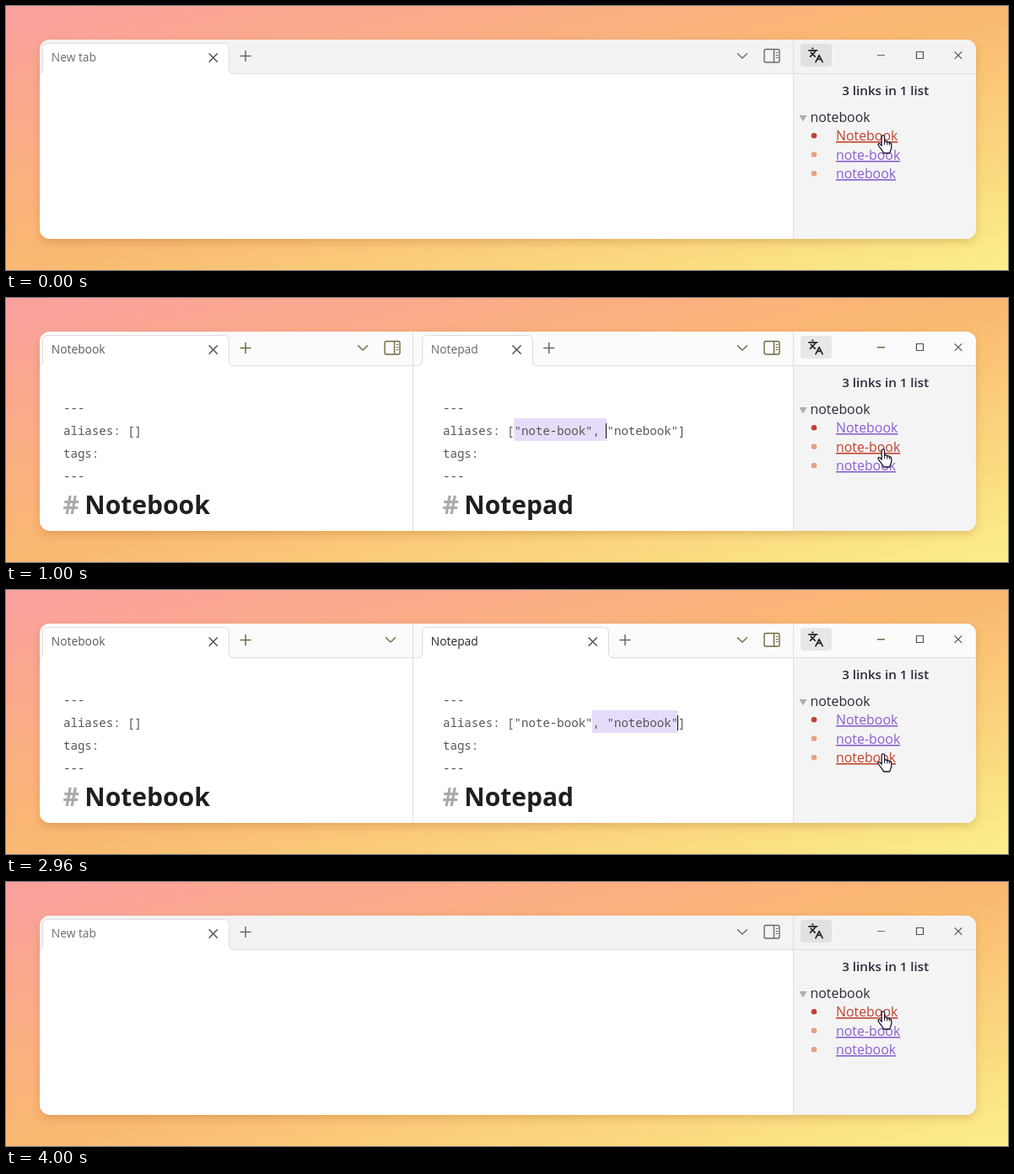
Write an HTML page that moves like this. It is 1188x314 px and loops after 4.04 s.

```html
<!DOCTYPE html>
<html lang="en">
<head>
<meta charset="utf-8">
<title>Alias links</title>
<style>
  html, body { margin: 0; width: 100%; height: 100%; overflow: hidden; }
  svg { display: block; width: 1188px; height: 314px; }
  text { font-family: "Open Sans", "Noto Sans", sans-serif; white-space: pre; }
  .tab { font-size: 13.8px; }
  .mono { font: 14.1px "Noto Sans Mono", "DejaVu Sans Mono", monospace; fill: #555; }
  .heading { font-size: 30px; font-weight: 700; fill: #1f1f22; }
  .hash { fill: #aaa; }
  .side { font-size: 15.9px; }
  .link { text-decoration: underline; text-decoration-thickness: 1px; text-underline-offset: 2px; }
  .line { fill: none; stroke-linecap: round; stroke-linejoin: round; }
</style>
</head>
<body>
<svg viewBox="0 0 1188 314">
  <defs>
    <linearGradient id="sky" x1="0" y1="0" x2="1" y2="1">
      <stop offset="0" stop-color="#faa09f"/>
      <stop offset=".5" stop-color="#fab870"/>
      <stop offset="1" stop-color="#fbef8a"/>
    </linearGradient>
    <clipPath id="window"><rect x="40" y="40" width="1110" height="237" rx="12"/></clipPath>
    <filter id="shadow" x="-5%" y="-20%" width="110%" height="150%">
      <feDropShadow dx="0" dy="4" stdDeviation="5" flood-color="#7a3a10" flood-opacity=".2"/>
    </filter>
  </defs>
  <rect width="1188" height="314" fill="url(#sky)"/>
  <rect x="40" y="40" width="1110" height="237" rx="12" fill="#fff" filter="url(#shadow)"/>
  <g id="scene" clip-path="url(#window)"></g>
  <g id="hand">
    <path d="M5.2 13.6V2.8a1.7 1.7 0 0 1 3.4 0V9C9 7.8 11.6 8 11.8 9.6C12.3 8.6 14.2 9 14.4 10.4C15.2 9.8 16.8 10.4 16.8 12V15.5C16.8 18 15.2 19.2 14.8 22.3H7.4C7 19.8 4.5 18 2.5 14.8C1 12.6 .5 11.6 1.6 11C2.8 10.4 4 11.6 5.2 13.6Z"
      fill="#fff" stroke="#1c1626" stroke-width="1.3" stroke-linejoin="round"/>
    <path d="M8.6 9V12.5M11.8 9.6V12.8M14.4 10.4V13" stroke="#1c1626" fill="none"/>
  </g>
</svg>
<script>
const LOOP = 4040;
const OPEN = 80, SPLIT = 800, LOADED = 960, SETTLED = 1120, SELECT = 1800, RESET = 3600;
const scene = document.getElementById('scene');
const hand = document.getElementById('hand');

// Time and height of the pointer; each height holds until the next.
const pointer = [
  [0, 152], [240, 154], [280, 158], [360, 167], [440, 172], [480, 175], [560, 178],
  [1120, 179], [1200, 182], [1240, 185], [1320, 188], [1360, 190], [1440, 191],
  [1560, 192], [1640, 193],
  [3600, 187], [3680, 176], [3760, 167], [3840, 160], [3920, 156], [3960, 153], [4000, 152]
];

const within = (t, from, to) => t >= from && t < to;
const rect = (x, y, w, h, fill, extra = '') =>
  `<rect x="${x}" y="${y}" width="${w}" height="${h}" fill="${fill}" ${extra}/>`;
const text = (x, y, words, cls, fill) =>
  `<text x="${x}" y="${y}" class="${cls}"${fill ? ` fill="${fill}"` : ''}>${words}</text>`;
const line = (d, color, width = 1.4) =>
  `<path class="line" d="${d}" stroke="${color}" stroke-width="${width}"/>`;
const cross = (x, y, r, color, width) =>
  line(`M${x - r} ${y - r}l${2 * r} ${2 * r}m0 ${-2 * r}l${-2 * r} ${2 * r}`, color, width);
const chevron = (x, color) => line(`M${x - 5.5} 56.7l5.5 5.3l5.5 -5.3`, color);
const panelIcon = (x, color) =>
  line(`M${x - 7} 51.5h14q2 0 2 2v11.5q0 2 -2 2h-14q-2 0 -2 -2v-11.5q0 -2 2 -2zm9.5 0v15.500`, color)
  + line(`M${x + 5} 55.5h2m-2 3h2m-2 3h2`, color, 1);

function tab(x, width, title, titleColor, iconColor) {
  const right = x + width, id = 'tab' + x;
  const shape = `M${x - 5.5} 80.5Q${x + .5} 80.5 ${x + .5} 75V50.5Q${x + .5} 44.5 ${x + 6.5} 44.5`
    + `H${Math.max(x + 6.5, right - 5.5)}Q${right + .5} 44.5 ${right + .5} 50.5V75Q${right + .5} 80.5 ${right + 6} 80.5`;
  let out = `<path d="${shape}V82H${x - 5.5}Z" fill="#fff"/>` + line(shape, '#dcdcdc', 1);
  if (width > 30) {
    out += `<clipPath id="${id}"><rect x="${x}" y="44" width="${width - 26}" height="36"/></clipPath>`
      + `<g clip-path="url(#${id})">${text(x + 10.8, 66, title, 'tab', titleColor)}</g>`
      + cross(right - 18.3, 61.5, 4.7, '#55505a', 1.5);
  }
  return out + line(`M${right + 14} 59.5h12m-6 -6v12`, iconColor, 1.5);
}

function page(x, title, aliases) {
  return text(x, 136, '---', 'mono') + text(x, 163, `aliases: [${aliases}]`, 'mono')
    + text(x, 190, 'tags:', 'mono') + text(x, 217, '---', 'mono')
    + text(x - .5, 257, '#', 'heading hash') + text(x + 25.3, 257, title, 'heading');
}

function sidebar(y, ink, isNew) {
  const hovered = y < 166 ? 0 : y < 189 ? 1 : 2;
  let out = rect(934, 81, 216, 196, '#f4f4f4')
    + rect(942, 45, 37, 27, isNew ? '#e1e1e1' : '#e7e7e7', 'rx="4"')
    + '<g transform="translate(950.3 48.8) scale(.81)">'
    + line('M5 8l6 6M4 14l6 -6l2 -3M2 5h12M7 2h1M22 22l-5 -10l-5 10M14 18h6', '#29222e', 2.1) + '</g>'
    + rect(1033, 58, 9, isNew ? 1 : 1.5, ink)
    + line('M1079.5 54.5h8v8h-8z', '#544b50', 1.2)
    + cross(1129, 58.7, 4, '#544b50', 1.1)
    + '<text x="1042.7" y="106" text-anchor="middle" font-size="15.2" font-weight="600" fill="#30263a">3 links in 1 list</text>'
    + '<path d="M940.5 130h9l-4.5 7.5z" fill="#b9a9a9"/>'
    + text(953.5, 138, 'notebook', 'side', '#30283a');
  ['Notebook', 'note-book', 'notebook'].forEach((name, i) => {
    const mid = 154.3 + 22.5 * i;
    out += `<circle cx="958" cy="${mid}" r="3.3" fill="${i ? '#e5a283' : '#c1413a'}"/>`
      + text(984, Math.round(mid + 5.7), name, 'side link', i === hovered ? '#c0432f' : '#8a5fd0');
  });
  return out;
}

function selection(t) {
  const advance = 8.43, start = 518;
  const [from, to] = t < SELECT ? [10, 23] : [21, 33];
  return rect(start + from * advance, 143, (to - from) * advance + .5, 27, '#e6dcfa');
}

function draw(t) {
  const y = pointer.filter(([time]) => time <= t).pop()[1];
  const isNew = t < OPEN || t >= RESET;
  const split = within(t, SPLIT, RESET);
  const ink = isNew ? '#6f6670' : '#71683f';
  let out = rect(40, 40, 1110, 41, isNew ? '#f3f3f3' : '#fbfbfb')
    + rect(40, 80, 1110, 1, '#dedede')
    + chevron(873, ink) + panelIcon(908, ink);

  out += tab(43, 221, isNew ? 'New tab' : 'Notebook', isNew ? '#6e6a6c' : split ? '#5b595c' : '#333036', ink);
  if (!isNew) out += page(split ? 68 : 93, 'Notebook', '');
  if (within(t, OPEN, 640)) out += rect(92, 116, 1, 27, '#111');

  if (split) {
    const rest = 1 - Math.min(1, Math.max(0, (t - 940) / 242));
    const width = t < LOADED ? 9 : 9 + 212 * (1 - rest ** 3);
    out += rect(482, 40, 1, 237, '#dedede')
      + tab(493, width, 'Notepad', t < SELECT ? '#6a676b' : '#27242a', '#6c675c');
    if (t >= LOADED) {
      out += selection(t) + page(518, 'Notepad', '"note-book", "notebook"');
      if (within(t, LOADED, 1520)) out += rect(711, 149, 1, 18, '#111');
      if (within(t, SELECT, 2360) || t >= 2960) out += rect(796, 149, 1, 18, '#111');
      out += t < SETTLED ? chevron(423, ink) + panelIcon(458, ink) : chevron(456, ink);
    }
  }
  scene.innerHTML = out + sidebar(y, ink, isNew) + rect(933, 40, 1, 237, '#dedede');
  hand.setAttribute('transform', `translate(1033 ${y + .7})`);
}

const began = performance.now();
let shown = -1;
function tick() {
  const t = Math.floor((performance.now() - began) % LOOP / 40) * 40;
  if (t !== shown) draw(shown = t);
  requestAnimationFrame(tick);
}
tick();
</script>
</body>
</html>
```
